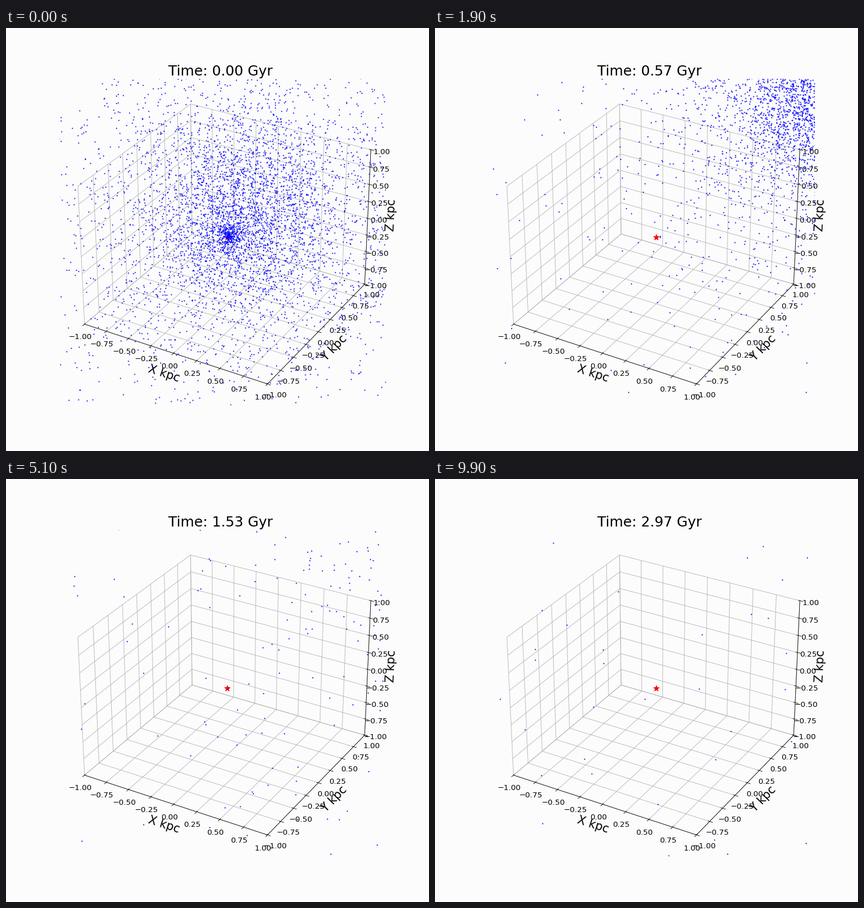
A matplotlib script that plays this animation: 748x748 px, repeating every 10 s.

```python
import numpy as np
import matplotlib.pyplot as plt
from matplotlib.animation import FuncAnimation

SIZE, DPI = 748, 74.8
FRAMES = 100
BACK = "#fcfcfc"
RECT = [0.1275, 0.11, 0.77, 0.77]
N, CUSP = 6500, 1200

rng = np.random.default_rng(7)
u = rng.random(N)
angle = rng.uniform(0, 2 * np.pi, N)
radius = np.sqrt(u / (1 - u))  # projected Plummer profile
unit = np.column_stack([np.cos(angle), np.sin(angle)])
cloud = unit * radius[:, None]
cusp = (394, 367) + 85 * unit[:CUSP] * radius[:CUSP, None] ** 2


def cloud_at(t):
    """Screen positions of the stars still bound at time t in seconds."""
    centre = np.array([425, 325]) + np.array([150, -122]) * t**0.75
    scale = 110 + 7 * t**2 + 70 * np.exp(-t / 0.3)
    pts = centre + scale * cloud
    pull = max(0.0, 1 - t / 0.6)
    pts[:CUSP] += pull * (cusp - pts[:CUSP])
    return pts[:int(N * np.exp(-t / 8))]


def opacity(t):
    return min(1.0, 1.1 + 0.57 * np.cos(2 * np.pi * (t - 1.3) / 4.4))


fig = plt.figure(figsize=(SIZE / DPI, SIZE / DPI), dpi=DPI, facecolor=BACK)
ax = fig.add_axes(RECT, projection="3d", facecolor=BACK)
ax.scatter([0], [0], [0], marker="*", color="red", s=100, depthshade=False)
ax.set(xlim=(-1, 1), ylim=(-1, 1), zlim=(-1, 1))
ax.tick_params(labelsize=13)
for name, axis in zip("XYZ", (ax.xaxis, ax.yaxis, ax.zaxis)):
    axis.set_pane_color((1, 1, 1, 0))
    axis.set_label_text(f"{name} kpc", fontsize=20)
# 3D axes lower a given title height by 0.92
title = ax.set_title("", fontsize=24, y=1 / 0.92)

# Flat layer in pixel coordinates, clipped to the plot square
sky = fig.add_axes(RECT)
sky.axis("off")
left, bottom, width, height = (SIZE * v for v in RECT)
sky.set_xlim(left, left + width)
sky.set_ylim(SIZE - bottom, SIZE - bottom - height)
dots = sky.scatter([], [], s=1, color="blue")


def update(i):
    t = i / 10
    pts = cloud_at(t)
    inside = np.all(np.abs(pts - (383, 378)) < 295, axis=1)
    dots.set_offsets(pts[inside])
    dots.set_alpha(opacity(t))
    # The trailing space shifts the centred title slightly left
    title.set_text(f"Time: {0.03 * i:.2f} Gyr ")
    return dots, title


anim = FuncAnimation(fig, update, frames=FRAMES, interval=100,
                     repeat=True, repeat_delay=0, blit=False)
plt.show()
```
